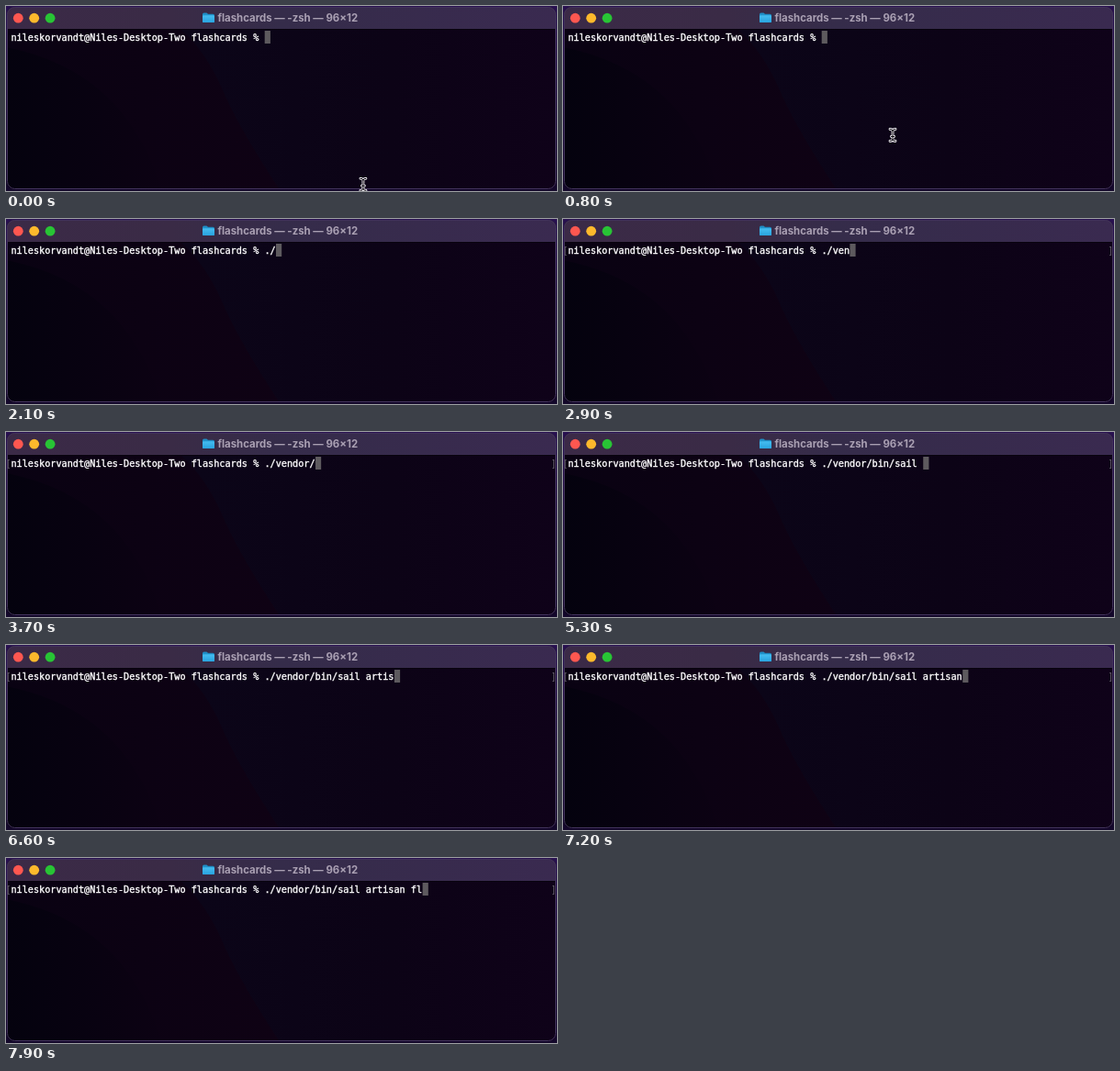
An HTML page for the animation above (8 s loop, 600 px wide and 202 px high).

```html
<!DOCTYPE html>
<html lang="en">
<head>
<meta charset="utf-8">
<title>Terminal</title>
<style>
  html, body { margin: 0; width: 100%; height: 100%; overflow: hidden; background: #170930; }
  svg { display: block; }
  .title { font: 700 11.4px Inter, "Open Sans", sans-serif; fill: #aaa0b3; }
  .mono { font: 10.2px "DejaVu Sans Mono", monospace; white-space: pre; }
  #line { fill: #fff; stroke: #fff; stroke-width: .35px; }
  #marks { fill: #66606c; }
</style>
</head>
<body>
<svg width="600" height="202" viewBox="0 0 600 202">
  <defs>
    <clipPath id="frame"><rect x="1" y="1" width="598" height="199" rx="8"/></clipPath>
    <linearGradient id="desktop" x2="0" y2="1">
      <stop offset="0" stop-color="#281050"/>
      <stop offset="1" stop-color="#13072a"/>
    </linearGradient>
    <linearGradient id="right">
      <stop offset=".35" stop-color="#0b0518"/>
      <stop offset=".7" stop-color="#0c0316"/>
      <stop offset="1" stop-color="#0f0219"/>
    </linearGradient>
    <linearGradient id="left">
      <stop offset="0" stop-color="#090212"/>
      <stop offset="1" stop-color="#0f0214"/>
    </linearGradient>
    <linearGradient id="corner">
      <stop offset="0" stop-color="#04020e"/>
      <stop offset="1" stop-color="#0c0213"/>
    </linearGradient>
    <linearGradient id="bar">
      <stop offset="0" stop-color="#3b2a47"/>
      <stop offset=".3" stop-color="#3a2b46"/>
      <stop offset=".5" stop-color="#352c4a"/>
      <stop offset="1" stop-color="#3a2a50"/>
    </linearGradient>
    <linearGradient id="folder" x2="0" y2="1">
      <stop offset="0" stop-color="#45bdf0"/>
      <stop offset="1" stop-color="#29a3de"/>
    </linearGradient>
    <path id="beam" d="M-3-6.5Q0-6.5 0-4.5Q0-6.5 3-6.5M0-4.5V4.5M-3 6.5Q0 6.5 0 4.5Q0 6.5 3 6.5M-1.5 1.5H1.5"/>
  </defs>

  <rect width="600" height="202" fill="url(#desktop)"/>
  <g clip-path="url(#frame)">
    <rect width="600" height="202" fill="url(#right)"/>
    <path d="M0 25H190Q218 50 236 92T299 202H0Z" fill="url(#left)"/>
    <path d="M0 45Q130 70 170 202H0Z" fill="url(#corner)"/>
    <rect width="600" height="25" fill="url(#bar)"/>
    <path d="M0 25.5H600" stroke="#08030e"/>
  </g>
  <rect x="1.5" y="1.5" width="597" height="198" rx="8" fill="none" stroke="#41325a"/>

  <circle cx="13.3" cy="13.2" r="5.4" fill="#fe5750"/>
  <circle cx="30.7" cy="13.2" r="5.4" fill="#fdb92c"/>
  <circle cx="48.1" cy="13.2" r="5.4" fill="#28c435"/>

  <path d="M214 9q0-1.5 1.5-1.5h3l1.5 1.3h5.500q1.5 0 1.5 1.5V17q0 1-1 1H215q-1 0-1-1Z" fill="#1f90c8"/>
  <rect x="214" y="10.3" width="13" height="7.7" rx="1" fill="url(#folder)"/>
  <text class="title" x="230.5" y="17">flashcards — -zsh — 96×12</text>

  <g id="marks" class="mono">
    <text x="-.5" y="37.5">[</text>
    <text x="593.2" y="37.5">]</text>
  </g>
  <rect id="cursor" y="27" width="6.2" height="14" fill="#5d5a5e"/>
  <text id="line" class="mono" x="5.4" y="37.5"></text>

  <g id="pointer" fill="none" stroke-linecap="round">
    <use href="#beam" stroke="#f4f2f6" stroke-width="2.8"/>
    <use href="#beam" stroke="#08040c"/>
  </g>
</svg>
<script>
  const LOOP = 8000, CHAR = 6.14, LEFT = 5.4;
  const prompt = 'nileskorvandt@Niles-Desktop-Two flashcards % ';
  const command = './vendor/bin/sail artisan fl';
  // [time in ms, characters typed]
  const typing = [[1700, 0], [2100, 2], [3600, 9], [5200, 18], [6600, 23], [7800, 28]];
  const $ = id => document.getElementById(id);

  function typedAt(t) {
    if (t < typing[0][0]) return 0;
    for (let i = 1; i < typing.length; i++) {
      const [t0, n0] = typing[i - 1], [t1, n1] = typing[i];
      if (t < t1) return Math.floor(n0 + (n1 - n0) * (t - t0) / (t1 - t0));
    }
    return command.length;
  }

  function draw(now) {
    const t = now % LOOP;
    const text = prompt + command.slice(0, typedAt(t));
    $('line').textContent = text;
    $('cursor').setAttribute('x', LEFT + text.length * CHAR);
    $('marks').style.display = t < 2800 ? 'none' : '';

    const move = 1 - (1 - Math.min(t / 800, 1)) ** 2;
    $('pointer').setAttribute('transform', `translate(${389 - 30 * move} ${195 - 54 * move})`);
    $('pointer').style.display = t < 1800 ? '' : 'none';
    requestAnimationFrame(draw);
  }
  draw(performance.now());
</script>
</body>
</html>
```
